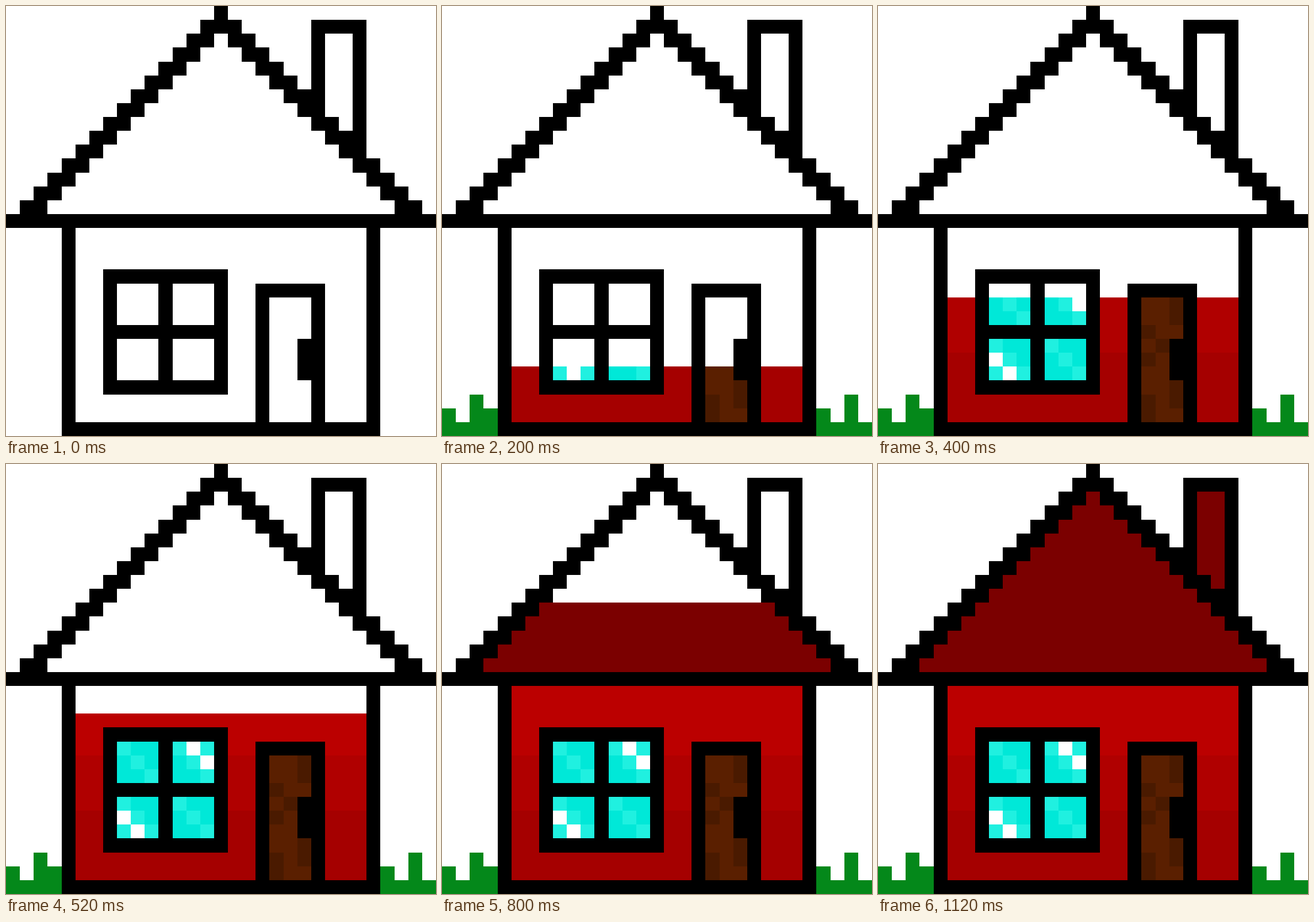
Write an HTML page with a canvas that moves like this. It is 748 px wide and 748 px high and loops after 1.16 s.

```html
<!DOCTYPE html>
<html lang="en">
<head>
<meta charset="utf-8">
<title>Pixel house</title>
<style>
html, body { margin: 0; width: 100%; height: 100%; overflow: hidden; background: #fff; }
canvas { display: block; width: 748px; height: 748px; }
</style>
</head>
<body>
<canvas width="748" height="748"></canvas>
<script>
const SIZE = 748, CELLS = 31, STEP = 40, STEPS = 29;
const ctx = document.querySelector('canvas').getContext('2d');
const edge = i => Math.round(i * SIZE / CELLS);

// Fill a block of grid cells
function block(color, col, row, cols = 1, rows = 1) {
  const x = edge(col), y = edge(row);
  ctx.fillStyle = color;
  ctx.fillRect(x, y, edge(col + cols) - x, edge(row + rows) - y);
}

const palette = { L: '#20f0e0', D: '#00e8d8', W: '#fff', b: '#5a1f00', d: '#4a1a00' };

function pattern(col, row, lines) {
  lines.split(' ').forEach((line, y) =>
    [...line].forEach((key, x) => block(palette[key], col + x, row + y)));
}

function paint() {
  // Roof and chimney
  for (let r = 2; r < 15; r++) block('#7b0000', 16 - r, r, 2 * r - 1);
  block('#7b0000', 23, 2, 2, 7);

  // Walls
  block('#bb0000', 5, 16, 21, 5);
  block('#b00000', 5, 21, 21, 4);
  block('#a50000', 5, 25, 21, 5);

  // Window panes and door
  pattern(8, 20, 'LDD DLD DDL');
  pattern(12, 20, 'LWL DLW DDL');
  pattern(8, 24, 'LDD WLD LWL');
  pattern(12, 24, 'LDD DLD DDL');
  pattern(19, 21, 'bbd bbd dbb bdb dbb bbb bbd dbd dbb');

  // Grass
  const grass = '#04881a';
  block(grass, 0, 30, 4);
  block(grass, 27, 30, 4);
  for (const col of [0, 3, 27]) block(grass, col, 29);
  for (const col of [2, 29]) block(grass, col, 28, 1, 2);
}

function outline() {
  const ink = (...box) => block('#000', ...box);
  ink(15, 0);
  for (let r = 1; r < 15; r++) {
    ink(15 - r, r, 2);
    ink(14 + r, r, 2);
  }
  ink(0, 15, 31);

  // Chimney
  ink(22, 1, 4);
  ink(22, 1, 1, 8);
  ink(25, 1, 1, 10);

  // House
  ink(4, 16, 1, 15);
  ink(26, 16, 1, 15);
  ink(4, 30, 23);

  // Window frame
  for (const i of [0, 4, 8]) {
    ink(7, 19 + i, 9);
    ink(7 + i, 19, 1, 9);
  }

  // Door frame and handle
  ink(18, 20, 5);
  ink(18, 20, 1, 10);
  ink(22, 20, 1, 10);
  ink(21, 24, 1, 3);
}

const start = performance.now();

function draw() {
  const time = Math.max(0, performance.now() - start);
  const step = Math.floor(time / STEP) % STEPS;
  // Colour rises one row per step, skipping the solid eaves row
  const top = step < 16 ? 31 - step : 30 - step;
  paint();
  block('#fff', 0, 0, CELLS, top);
  outline();
  requestAnimationFrame(draw);
}

block('#fff', 0, 0, CELLS, CELLS);
draw();
</script>
</body>
</html>
```
